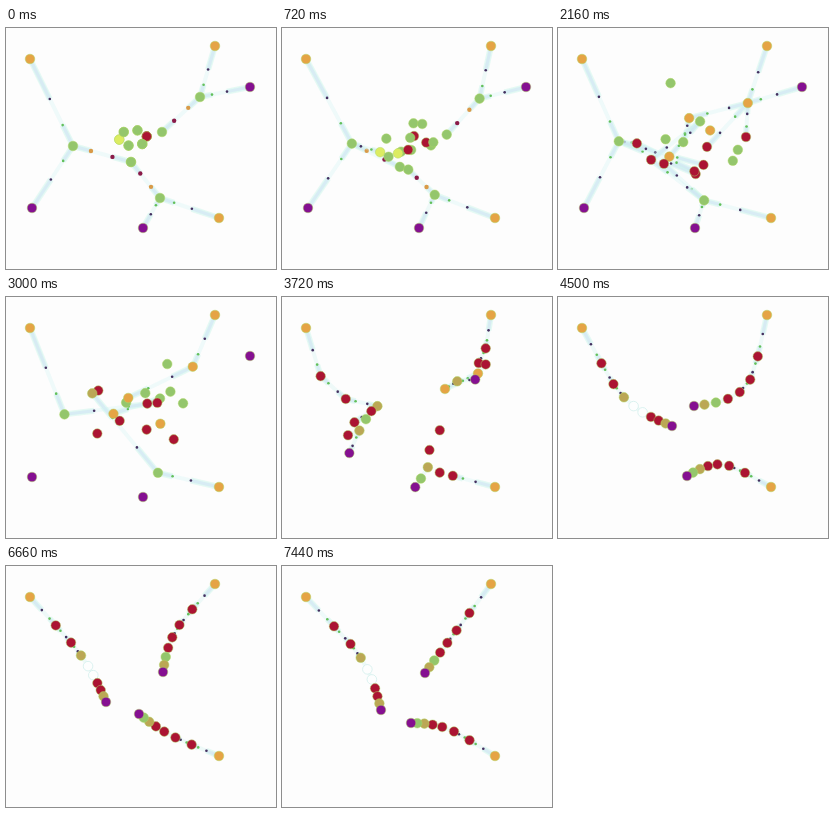
Animation of 270x241 px, one loop 7500 ms. Source, as an HTML page with a canvas:

```html
<!DOCTYPE html>
<html lang="en">
<head>
<meta charset="utf-8">
<title>Folding chains</title>
<style>
html, body { margin: 0; width: 100%; height: 100%; overflow: hidden; background: #fdfdfd; }
canvas { display: block; width: 270px; height: 241px; }
</style>
</head>
<body>
<canvas id="stage" width="270" height="241"></canvas>
<script>
const LOOP = 7500, STEP = 60;
const ctx = document.getElementById('stage').getContext('2d');

// The tree starts as root - hub - joint with a tip on each hub.
// swing: tip x, tip y and sideways bulge of the chain at each of swingTimes.
const swingTimes = [3000, 4500, 5520, 6660, 7440];
const chains = [
  {
    root: [24, 31], hub: [67, 118], joint: [125, 134], tints: 'RRTWWRRTP',
    swing: [[26, 180, 0], [114, 129, -16], [112, 102, -4], [100, 136, 7], [99, 144, 12]]
  },
  {
    root: [209, 18], hub: [194, 69], joint: [156, 104], tints: 'RRRRGTP',
    swing: [[244, 59, 0], [136, 109, 28], [106, 158, -11], [157, 106, -10], [143, 107, 0]]
  },
  {
    root: [213, 190], hub: [154, 170], joint: [125, 134], tints: 'RRRRTGP',
    swing: [[137, 200, 0], [129, 179, -16], [153, 139, 34], [133, 148, 4], [129, 157, -8]]
  }
];

const tint = {
  R: '#ab1433', G: '#94c66c', O: '#e5a445', P: '#851091',
  T: '#bba755', Y: '#dcec62', W: '#fdfefe'
};

let seed = 11;
function rand() {
  seed = (seed * 16807) % 2147483647;
  return seed / 2147483647;
}

const mix = (a, b, f) => a + (b - a) * f;
const between = (a, b, f) => ({ x: mix(a.x, b.x, f), y: mix(a.y, b.y, f) });
const smooth = (from, to, t) => {
  const u = Math.min(1, Math.max(0, (t - from) / (to - from)));
  return u * u * (3 - 2 * u);
};

// Loose beads share six places on a small ring in the middle.
function ringPlace(slot) {
  const a = slot * Math.PI / 3 - 0.2;
  return [127 + 14 * Math.cos(a), 110 + 8 * Math.sin(a)];
}

// Share of the chain's length up to bead i: gaps shrink towards the tip.
function share(i, n) {
  const length = count => {
    let sum = 0;
    for (let j = 1; j <= count; j++) sum += 1 / (j + 0.5);
    return sum;
  };
  return length(i) / length(n);
}

const loose = [];
for (const chain of chains) {
  const n = chain.tints.length;
  chain.beads = [...chain.tints].map((finalTint, k) => {
    const isLoose = k > 1 && k < n - 1;
    const slot = loose.length % 6;
    const bead = {
      share: share(k + 1, n),
      start: k === 0 ? chain.hub : k === 1 ? chain.joint : ringPlace(slot),
      reach: isLoose ? 14 + 55 * rand() ** 2 : 7 + 9 * k,
      phase: rand() * 2 * Math.PI,
      spin: rand() < 0.5 ? -1 : 1,
      join: 2700 + rand() * 500,
      finalTint,
      firstTint: isLoose && slot === 0 ? 'R' : isLoose && slot === 3 ? 'Y' : 'G',
      midTint: 'GRGORW'[Math.floor(rand() * 6)],
      turn: 700 + rand() * 600,
      settle: 2900 + rand() * 1400
    };
    if (isLoose) loose.push(bead);
    return bead;
  });
}

// Short-lived bonds among the loose beads and the hubs.
const hubs = chains.map(chain => chain.beads[0]);
const strays = loose.slice(0, 10).map((bead, i) => ({
  a: bead,
  b: i % 2 ? hubs[i % 3] : loose[Math.floor(rand() * loose.length)],
  from: 600 + rand() * 700,
  to: 2000 + rand() * 1600
}));

function swingAt(keys, t) {
  let i = 0;
  while (i < keys.length - 2 && t >= swingTimes[i + 1]) i++;
  const f = smooth(swingTimes[i], swingTimes[i + 1], t);
  const [x, y, sag] = keys[i].map((v, axis) => mix(v, keys[i + 1][axis], f));
  return { x, y, sag };
}

function chainPoint(root, tip, f) {
  const dx = tip.x - root.x, dy = tip.y - root.y;
  const off = tip.sag * Math.sin(Math.PI * f ** 1.3) / Math.hypot(dx, dy);
  return { x: root.x + dx * f + dy * off, y: root.y + dy * f - dx * off };
}

function wander(bead, t) {
  const a = bead.phase + bead.spin * t / 900;
  const r = bead.reach * Math.sin(Math.PI * Math.min(1, t / 4500));
  return { x: bead.start[0] + 1.2 * r * Math.cos(a), y: bead.start[1] + r * Math.sin(a) };
}

function move(t) {
  for (const chain of chains) {
    const root = { x: chain.root[0], y: chain.root[1], key: 'O' };
    const tip = swingAt(chain.swing, t);
    chain.rootBead = root;
    for (const bead of chain.beads) {
      const isTip = bead.finalTint === 'P';
      const joined = isTip ? 1 : smooth(bead.join, bead.join + 1200, t);
      Object.assign(bead, between(wander(bead, t), chainPoint(root, tip, bead.share), joined));
      bead.joined = joined;
      bead.key = isTip || t >= bead.settle ? bead.finalTint
        : t >= bead.turn ? bead.midTint : bead.firstTint;
    }
  }
}

function line(a, b, width, color) {
  ctx.beginPath();
  ctx.moveTo(a.x, a.y);
  ctx.lineTo(b.x, b.y);
  ctx.lineWidth = width;
  ctx.strokeStyle = color;
  ctx.stroke();
}

function disc(p, r, fill, edge) {
  ctx.beginPath();
  ctx.arc(p.x, p.y, r, 0, 2 * Math.PI);
  ctx.fillStyle = fill;
  ctx.fill();
  if (edge) {
    ctx.lineWidth = 0.8;
    ctx.strokeStyle = edge;
    ctx.stroke();
  }
}

function drawBond(a, b, toEnd, large) {
  const p = between(a, b, toEnd ? 0.24 : 0.31);
  const q = between(a, b, toEnd ? 0.54 : 0.68);
  line(a, b, 4, 'rgba(205, 242, 240, 0.3)');
  for (const [from, to] of [[a, p], [b, q]]) {
    line(from, to, 6, 'rgba(205, 245, 235, 0.5)');
    line(from, to, 3, 'rgba(205, 218, 245, 0.4)');
  }
  const r = large ? 2.2 : 1.3;
  if (Math.hypot(a.x - b.x, a.y - b.y) < 14) return;
  disc(p, r, large ? '#d99a48' : '#62c05a');
  disc(q, r, large ? '#8a1a48' : '#43305f');
}

function drawBonds(t) {
  for (const { rootBead, beads } of chains) {
    const [hub, joint] = beads;
    drawBond(hub, rootBead, true);
    if (t < 2500) drawBond(hub, beads[beads.length - 1], true);
    if (t < 2800) drawBond(hub, joint, false, t < 1500);
    beads.slice(1).forEach((bead, i) => {
      if (bead.joined > 0.5 && beads[i].joined > 0.5) drawBond(beads[i], bead);
    });
  }
  for (const { a, b, from, to } of strays) {
    if (a !== b && t >= from && t < to) drawBond(a, b);
  }
}

function draw(t) {
  move(t);
  ctx.fillStyle = '#fdfdfd';
  ctx.fillRect(0, 0, 270, 241);
  drawBonds(t);
  for (const { rootBead, beads } of chains) {
    for (const bead of [rootBead, ...beads]) {
      disc(bead, 4.8, tint[bead.key], bead.key === 'W' ? '#d3efec' : 'rgba(175, 215, 100, 0.6)');
    }
  }
}

const start = performance.now();
function tick() {
  const t = (performance.now() - start) % LOOP;
  draw(Math.floor(t / STEP) * STEP);
  requestAnimationFrame(tick);
}
tick();
</script>
</body>
</html>
```
